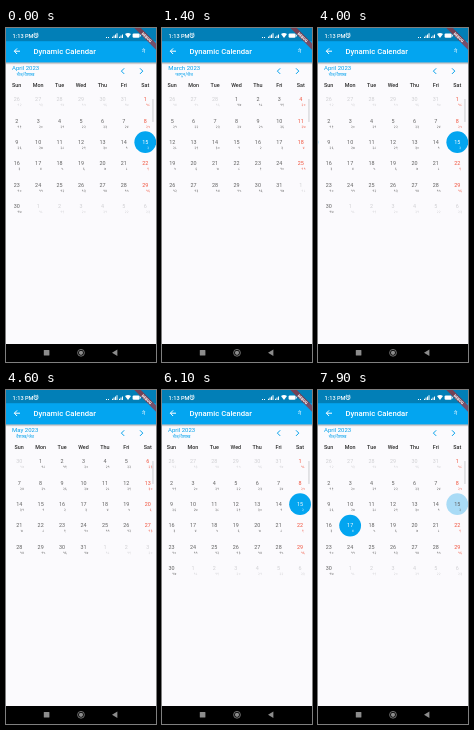
An HTML page that plays this animation: 150x334 px, repeating every 8000 ms.

```html
<!DOCTYPE html>
<html lang="en">
<head>
<meta charset="utf-8">
<title>Dynamic Calendar</title>
<style>
html, body { margin: 0; width: 100%; height: 100%; overflow: hidden; background: #fbfafd; }
svg { display: block; width: 100vw; height: 100vh; font-family: Roboto, "Noto Sans", sans-serif; }
text { dominant-baseline: central; }
.mid text, #sub, #month { text-anchor: middle; }
.week { font-size: 5.4px; font-weight: 500; fill: #2c2c2c; }
.day { font-size: 5.4px; fill: #606060; }
.bs { font-size: 3.7px; }
.out { fill: #cfcfd2; }
.sat { fill: #f0523c; }
.on { fill: #fff; }
</style>
</head>
<body>
<svg viewBox="0 0 150 334">
  <defs>
    <linearGradient id="shade" x2="0" y2="1">
      <stop stop-color="#000" stop-opacity=".36"/><stop offset="1" stop-color="#000" stop-opacity="0"/>
    </linearGradient>
  </defs>
  <rect width="150" height="334" fill="#fbfafd"/>

  <g id="pages"><g id="grid" class="mid"></g><use id="next" href="#grid"/></g>

  <g fill="#03a1ec">
    <text id="month" y="39.2" font-size="6"></text>
    <text id="sub" y="46.4" font-size="4.7"></text>
  </g>
  <path d="M115.4 40.3l2.8 2.8-2.8 2.8" transform="rotate(180 116.8 43.1)" fill="none" stroke="#03a1ec"/>
  <path d="M134 40.3l2.8 2.8-2.8 2.8" fill="none" stroke="#03a1ec"/>
  <rect x="146.4" y="71" width="1.1" height="23" rx=".5" fill="#d0d0d4"/>

  <rect y="34.2" width="150" height="2.6" fill="url(#shade)"/>
  <rect width="150" height="34.4" fill="#03a5f0"/>
  <rect width="150" height="13.2" fill="#027fb7"/>
  <g fill="#fff">
    <text x="6.6" y="7.5" font-size="5.6" font-weight="500">1:13 PM</text>
    <text x="27.4" y="23.3" font-size="7.7" font-weight="500">Dynamic Calendar</text>
    <text x="137.6" y="22.8" font-size="5.6" font-weight="500" text-anchor="middle">ने</text>
    <path d="M100 9h1v1h-1zm2 0h1v1h-1zM106 10v-1.3h1v1.3zm1.5 0v-2.4h1v2.4zm1.5 0v-3.6h1v3.6zm1.5 0v-4.8h1v4.8z"/>
    <path d="M113 10v-1.3h1v1.3zm1.5 0v-2.4h1v2.4zm1.5 0v-3.6h1v3.6zM119 5.9q3-1.8 6 0l-3 4.1z"/>
    <rect x="126.6" y="5.4" width="7" height="4.4" rx="1.2"/>
    <path d="M134 6.8h.8v1.6h-.8z"/>
  </g>
  <g fill="none" stroke="#fff" stroke-width=".8">
    <circle cx="30" cy="7.7" r="2"/>
    <path d="M30 6.5v1.3l.9.6M27.6 6l1.3-1.1M32.4 6l-1.3-1.1"/>
    <path d="M14 23.2H8.4m2.7-2.8l-2.8 2.8 2.8 2.8" stroke-width="1"/>
  </g>
  <g transform="translate(150) rotate(45)">
    <rect x="-15.3" y="10.7" width="30.6" height="4.6" fill="#b71c1c" fill-opacity=".63"/>
    <text y="13.1" font-size="3.9" font-weight="900" fill="#fff" text-anchor="middle">DEBUG</text>
  </g>

  <rect y="316" width="150" height="18" fill="#000"/>
  <g fill="#8c8c8c">
    <rect x="37.8" y="322" width="5.6" height="5.6" rx=".5"/>
    <circle cx="75" cy="324.8" r="2.1"/>
    <circle cx="75" cy="324.8" r="3.4" fill="none" stroke="#8c8c8c" stroke-width=".8"/>
    <path d="M106 324.8l5.4-3.2v6.4z"/>
  </g>
</svg>
<script>
const $ = id => document.getElementById(id);
const W = 150, CELL = W / 7, LOOP = 8000, DAY = 864e5, BLUE = '#03a5f0';
const weekdays = ['Sun', 'Mon', 'Tue', 'Wed', 'Thu', 'Fri', 'Sat'];
const months = [
  { m: 2, name: 'March 2023', sub: 'फागुन/चैत्र', x: 22.2 },
  { m: 3, name: 'April 2023', sub: 'चैत्र/वैशाख', x: 19.6 },
  { m: 4, name: 'May 2023', sub: 'वैशाख/जेठ', x: 19.2 },
];
const utc = (m, d) => Date.UTC(2023, m, d);
const TODAY = utc(3, 15);

// first days of the Bikram Sambat months
const bsStarts = [utc(1, 13), utc(2, 15), utc(3, 14), utc(4, 15)];
const bsDay = time => {
  const start = bsStarts.filter(s => s <= time).pop();
  const n = (time - start) / DAY + 1;
  return String(n).replace(/\d/g, d => String.fromCharCode(0x966 + +d));
};

// drag: start, release, scroll at start, scroll at release, scroll it settles on
const moves = [
  [0, 1000, 0, -130, -150],
  [2800, 2900, -150, -86, 0],
  [4100, 4200, 0, 4, 4],
  [4300, 4500, 4, 143.8, 150],
  [5600, 5700, 150, 148, 148],
  [5800, 6000, 148, 3, 0],
];

function scrollAt(t) {
  const [start, release, from, at, to] = moves.filter(m => m[0] <= t).pop();
  if (t < release) return from + (at - from) * (t - start) / (release - start);
  return to + (at - to) * Math.exp(-(t - release) / 110);
}

function buildGrid(m, selected) {
  let out = weekdays.map((w, i) =>
    `<text class="week" x="${(i + .5) * CELL}" y="57.2">${w}</text>`).join('');
  const first = utc(m, 1);
  let time = first - new Date(first).getUTCDay() * DAY;
  for (let row = 0; time < utc(m + 1, 1); row++) {
    for (let col = 0; col < 7; col++, time += DAY) {
      const date = new Date(time), x = (col + .5) * CELL, y = 71.1 + row * CELL;
      const inside = date.getUTCMonth() === m;
      const on = inside && time === selected;
      if (on || inside && time === TODAY)
        out += `<circle cx="${x}" cy="${y + .2}" r="10.9" fill="${on ? BLUE : '#a9dbf6'}"/>`;
      const kind = on ? 'on' : !inside ? 'out' : col === 6 && time !== TODAY ? 'sat' : '';
      out += `<g class="day ${kind}"><text x="${x}" y="${y}">${date.getUTCDate()}</text>` +
        `<text class="bs" x="${x + 2.7}" y="${y + 6}">${bsDay(time)}</text></g>`;
    }
  }
  return out;
}

let shown;
function draw(now) {
  const t = Math.floor(now % LOOP / 100) * 100;
  const scroll = scrollAt(t), page = Math.round(scroll / W), shift = page * W - scroll;
  const selected = utc(3, t < 6900 ? 15 : t < 7900 ? 13 : 17);
  const { m, name, sub, x } = months[page + 1];
  const key = name + selected;
  if (key !== shown) {
    shown = key;
    $('grid').innerHTML = buildGrid(m, selected);
    $('month').textContent = name;
    $('sub').textContent = sub;
    $('month').setAttribute('x', x);
    $('sub').setAttribute('x', x);
  }
  // the neighbouring page shows the same month until the page turns
  $('pages').setAttribute('transform', `translate(${shift})`);
  $('next').setAttribute('x', shift > 0 ? -W : W);
}

const begin = performance.now();
function tick() {
  draw(performance.now() - begin);
  requestAnimationFrame(tick);
}
tick();
</script>
</body>
</html>
```
